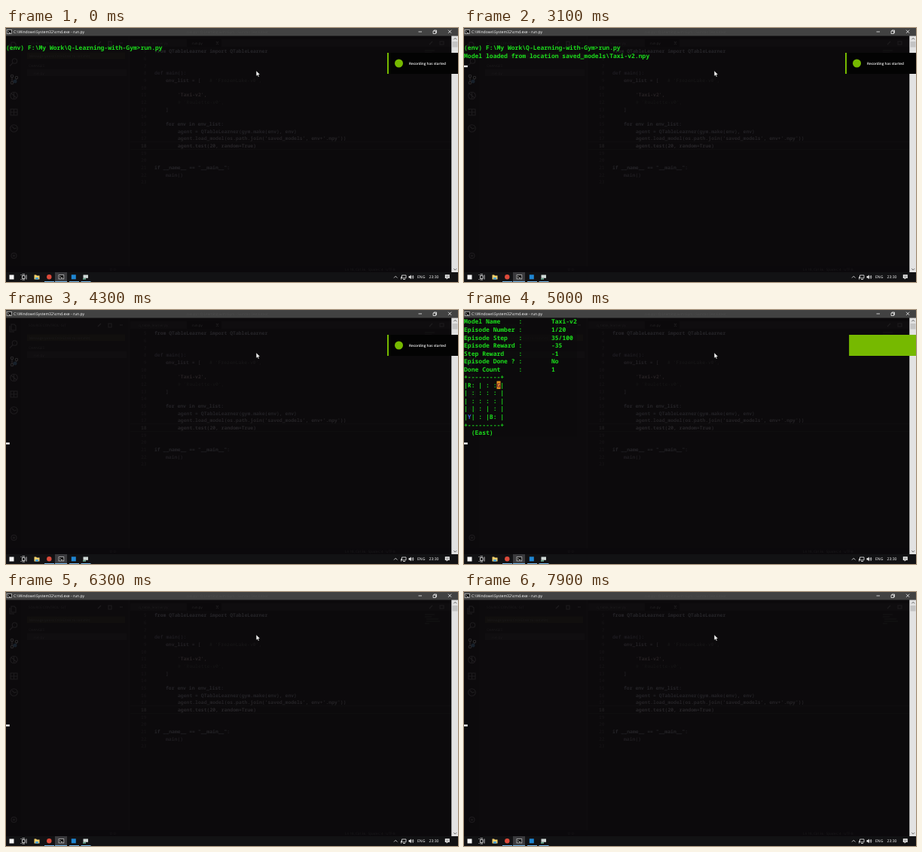
Animation, 600 px wide and 338 px high, one loop 8 s. Source, as an HTML page:

```html
<!DOCTYPE html>
<html lang="en">
<head>
<meta charset="utf-8">
<title>Console run</title>
<style>
html, body { margin: 0; width: 100%; height: 100%; overflow: hidden; background: #0c0a0c; }
svg { display: block; width: 600px; height: 338px; }
text { white-space: pre; text-rendering: geometricPrecision; }
.term { font: 600 8.05px "Noto Sans Mono", "DejaVu Sans Mono", monospace; fill: #1cdc1c; }
.code { font: 600 6.43px "Noto Sans Mono", "DejaVu Sans Mono", monospace; fill: #232226; }
.ui { font: 500 5.1px "Open Sans", "Noto Sans", sans-serif; fill: #fff; }
.dim { font: 4.6px "Open Sans", "Noto Sans", sans-serif; fill: #1d1b1d; }
.line { fill: none; stroke: #eee; stroke-width: .8; }
.ghost { fill: none; stroke: #1e1c1e; stroke-width: 1.1; }
</style>
</head>
<body>
<svg id="stage" viewBox="0 0 600 338" xmlns="http://www.w3.org/2000/svg">
  <rect width="600" height="338" fill="#0c0a0c"/>

  <!-- editor showing faintly through the console -->
  <g id="editor">
    <rect x="20" y="11" width="143" height="307" fill="#0d0b0d"/>
    <rect x="163" y="11" width="1.5" height="307" fill="#0f0d0f"/>
    <rect x="165" y="15" width="427" height="10" fill="#0f0d0f"/>
    <rect x="240" y="15" width="46" height="10" fill="#0b090b"/>
    <rect x="28" y="32.5" width="130" height="9" fill="#110f0e"/>
    <rect x="28" y="55" width="132" height="9" fill="#100e10"/>
    <rect x="0" y="317" width="592" height="8" fill="#0b090c"/>
    <path d="M165 151.500H592M165 161.500H592" stroke="#111011" stroke-width=".7"/>
    <g class="ghost">
      <path d="M7 19h4l2 2v6H7zM5 21v8h6"/>
      <circle cx="11.5" cy="44" r="3.2"/><path d="M9 46.500l-4 4"/>
      <g stroke="#2b292b"><circle cx="8" cy="64" r="1.7"/><circle cx="14" cy="66" r="1.7"/><circle cx="8" cy="73" r="1.7"/><path d="M8 66v5M14 68q-1 3-5 3"/></g>
      <circle cx="10.500" cy="90" r="4.800"/><path d="M7 87l7 6M10.500 86v8"/>
      <path d="M6 108h9v8H6zM10.500 108v8M6 112h9"/>
      <circle cx="10.500" cy="133.500" r="4.800"/><path d="M8 131l3 3 3-1"/>
      <circle cx="10.500" cy="303" r="3.500"/><circle cx="10.500" cy="303" r="1"/>
      <path d="M122 22l4-4M136 18h4v5h-4zM151 20h4M562 22l4-4M576 18h5v4h-5zM279 18l3 4M282 18l-3 4"/>
      <path d="M556 30h13M556 33h9M558 36h16M558 39h18M556 42h6" stroke-width=".6"/>
    </g>
    <circle cx="12" cy="71" r="2.500" fill="#17202a"/>
    <text class="dim" x="30" y="22">SOURCE CONTROL: GIT</text>
    <text class="dim" x="31" y="38.500" fill="#1d1a14">Message (press Ctrl+Enter to commit)</text>
    <text class="dim" x="30" y="51.500">CHANGES</text>
    <text class="dim" x="37" y="61.500">run.py</text>
    <text class="dim" x="176" y="22">q_table_learner.py</text>
    <text class="dim" x="247" y="22" style="fill:#2a282a">run.py</text>
    <text class="dim" x="138" y="323">0  0</text>
    <text class="dim" x="450" y="323">Ln 18, Col 36   Spaces: 4   UTF-8</text>
  </g>

  <!-- title bar -->
  <rect width="600" height="10.500" fill="#424242"/>
  <text class="dim" x="240" y="7" style="fill:#4c4c4c">run.py - Q-Learning-with-Gym - Summit Text Editor</text>
  <rect x="1" y="2.500" width="6.500" height="5" fill="#050505" stroke="#ddd" stroke-width=".7"/>
  <path class="line" d="M2.300 4l1.200 1-1.200 1M4 6.300h2" stroke-width=".6"/>
  <text class="ui" x="10" y="7">C:\Windows\System32\cmd.exe - run.py</text>
  <path class="line" d="M547.500 5h4.500M567 4h3.500v3.500H567zM568 4V3h3.500v3.500h-1M587 2.700l4.200 4.200M591.200 2.700L587 6.900"/>

  <!-- scrollbar -->
  <rect x="591.300" y="10.500" width="8.700" height="314.500" fill="#e2e2e2"/>
  <rect x="592.500" y="18" width="7" height="7.500" fill="#c4c4c4"/>
  <path d="M594.300 15.300l1.900-1.900 1.900 1.900M594.300 320.200l1.900 1.900 1.900-1.900" fill="none" stroke="#555" stroke-width=".9"/>

  <g id="console"></g>

  <!-- notification -->
  <g id="toast">
    <rect x="506" y="33" width="94" height="28" fill="#030303"/>
    <circle cx="521.500" cy="47" r="5.500" fill="#76b900"/>
    <text class="ui" x="535" y="48.800" style="font-size:4.650px;font-weight:600">Recording has started</text>
  </g>
  <rect id="cover" x="506" y="33" width="2" height="28" fill="#76b900"/>

  <!-- taskbar -->
  <rect y="325" width="600" height="13" fill="#121214"/>
  <rect x="65" y="325" width="16" height="13" fill="#3a3a3d"/>
  <rect x="4.500" y="328.500" width="6" height="6" fill="#f4f4f4"/>
  <path class="line" d="M21.500 329.500h3.500v4h-3.500zM20 328v1M20 334v1M27 328.500v6M21.500 327.800h3.500M21.500 335h3.500"/>
  <path d="M37.500 328.500h2.500l1 1h3.500v5h-7z" fill="#f3cf6b"/>
  <rect x="39" y="332" width="4" height="2.500" fill="#4aa3d8"/>
  <circle cx="57.300" cy="331.300" r="3.200" fill="#dc4a3a"/>
  <rect x="70" y="328.700" width="6.800" height="5.200" fill="#050505" stroke="#ddd" stroke-width=".7"/>
  <path class="line" d="M71.300 330.300l1.100.900-1.100.900M73 332.500h2"/>
  <rect x="86.800" y="328.300" width="6" height="6" fill="#1f86d2"/>
  <rect x="102.500" y="328.500" width="6.500" height="4.300" fill="#cfd8d6"/>
  <rect x="102" y="333" width="4" height="1.700" fill="#65a58b"/>
  <path d="M51 337.500h13M65 337.500h16M84 337.500h13M99.500 337.500h13" stroke="#76b9ed" stroke-width="1"/>
  <path class="line" d="M515 332.500l2.200-2.200 2.200 2.200"/>
  <path class="line" d="M525.500 329h5.500v3.800h-5.500zM527 334.500h3M524.500 331v3.500"/>
  <path d="M534.500 330.300h1.300l1.900-1.700v5.600l-1.900-1.700h-1.300z" fill="#eee"/>
  <path class="line" d="M538.800 330q1 1.400 0 2.800M540 329q1.800 2.400 0 4.800"/>
  <text class="ui" x="546" y="333.200">ENG</text>
  <text class="ui" x="561.500" y="333.200">23:30</text>
  <path d="M582.800 328.300h6v4.800h-2.500l-1.500 1.600v-1.600h-2z" fill="#f4f4f4"/>
  <path d="M584 330h3.600M584 331.500h3.600" stroke="#222" stroke-width=".5"/>

  <path d="M332.200 57v7l1.600-1.500 1.100 2.500 1.100-.5-1.100-2.400h2.200z" fill="#fff" stroke="#111" stroke-width=".3"/>
</svg>
<script>
const LOOP = 8000, TICK = 100, COL = 4.83, ROW = 10.55, TOP = 10.2;
const $ = id => document.getElementById(id);

function add(parent, tag, attrs, text = "") {
  const el = document.createElementNS("http://www.w3.org/2000/svg", tag);
  for (const key in attrs) el.setAttribute(key, attrs[key]);
  el.textContent = text;
  parent.append(el);
  return el;
}

const show = (el, on) => el.setAttribute("visibility", on ? "visible" : "hidden");
const clamp = v => Math.min(1, Math.max(0, v));

function codeLine(x, y, text, color) {
  add($("editor"), "text", { class: "code", x, y: y + 2.8, style: "fill:" + color }, text);
}

// x, y, text, colour of the editor lines
[
  [197, 30.5, "from QTableLearner import QTableLearner", "#262529"],
  [197, 59.5, "def main():", "#1d1b20"],
  [212, 69.2, "env_list = [", "#222024"],
  [270, 69.2, "# 'FrozenLake-v0',", "#151415"],
  [228, 88.5, "'Taxi-v2',", "#272224"],
  [228, 98.2, "# 'Roulette-v0',", "#131213"],
  [212, 107.8, "]", "#222024"],
  [212, 127.2, "for env in env_list:", "#252428"],
  [228, 136.8, "agent = QTableLearner(gym.make(env), env)", "#232226"],
  [228, 146.5, "agent.load_model(os.path.join('saved_models', env+'.npy'))", "#252326"],
  [228, 156.2, "agent.test(20, random=True)", "#282629"],
  [197, 185.2, "if __name__ == \"__main__\":", "#252428"],
  [212, 194.8, "main()", "#1f1d21"]
].forEach(line => codeLine(...line));

for (let n = 5; n < 24; n++) {
  codeLine(179, 30.5 + (n - 5) * 9.67, String(n).padStart(2), n === 18 ? "#1f1d1f" : "#141214");
}

function print(parent, row, text, col = 0) {
  return add(parent, "text", { class: "term", x: col * COL, y: TOP + row * ROW + 8.2 }, text);
}

const shell = add($("console"), "g", {});
print(shell, 1, "(env) F:\\My Work\\Q-Learning-with-Gym>run.py");
const loaded = print(shell, 2, "Model loaded from location saved_models\\Taxi-v2.npy");

const table = add($("console"), "g", {});
add(table, "rect", { y: 10.5, width: 150, height: 158, fill: "#0c0a0c", opacity: .6 });
const labels = ["Model Name", "Episode Number", "Episode Step", "Episode Reward", "Step Reward", "Episode Done ?", "Done Count"];
const values = ["Taxi-v2", "1/20", "", "", "-1", "No", "1"];
const cells = labels.map((label, i) => {
  print(table, i, label.padEnd(15) + ":");
  return print(table, i, values[i], 24);
});
[
  "+---------+",
  "|R: | : : |",
  "| : : : : |",
  "| : : : : |",
  "| | : | : |",
  "| | : |B: |",
  "+---------+",
  "  (East)"
].forEach((line, i) => print(table, 7 + i, line));
print(table, 12, "Y", 1).style.fill = "#3f63e8";
add(table, "rect", { x: 9 * COL, y: TOP + 8 * ROW, width: COL + .2, height: ROW, fill: "#e2921e" });
print(table, 8, "G", 9).style.fill = "#7c2a3a";

const cursor = add($("console"), "rect", { x: 0, width: COL, height: 2.4, fill: "#f2f2f2" });

// cursor blink: [time, visible]
const blink = [[0, 0], [1000, 1], [1500, 0], [2100, 1], [2600, 0], [3100, 1]];
const CLEAR = 3300;

function stepAt(t) {
  const n = t < 5000 ? 1 + (t - 3400) / 1600 * 34 : 35 + (t - 5000) * .027;
  return Math.min(100, Math.round(n));
}

function draw(now) {
  const t = Math.floor(now % LOOP / TICK) * TICK;
  const running = t >= CLEAR;

  show(shell, !running);
  loaded.setAttribute("opacity", t < 300 ? 0 : t < 400 ? .85 : 1);

  // the screen is cleared and printed again in turn
  show(table, running && t / TICK % 2 === 0);
  const step = stepAt(t);
  cells[2].textContent = step + "/100";
  cells[3].textContent = -step;

  const row = t > CLEAR ? 15 : 3;
  cursor.setAttribute("y", TOP + (row + 1) * ROW - 2.6);
  show(cursor, blink.filter(b => b[0] <= t).pop()[1]);

  // green wipes over the notice, then slides out to the right
  const wipe = clamp((t - 4600) / 300);
  const slide = clamp((t - 4900) / 400) ** 2.1;
  show($("toast"), wipe < 1);
  $("cover").setAttribute("width", 2 + 92 * wipe);
  $("cover").setAttribute("x", 506 + 94 * slide);
  show($("cover"), slide < 1);
}

function frame() {
  draw(performance.now());
  requestAnimationFrame(frame);
}
frame();
</script>
</body>
</html>
```
